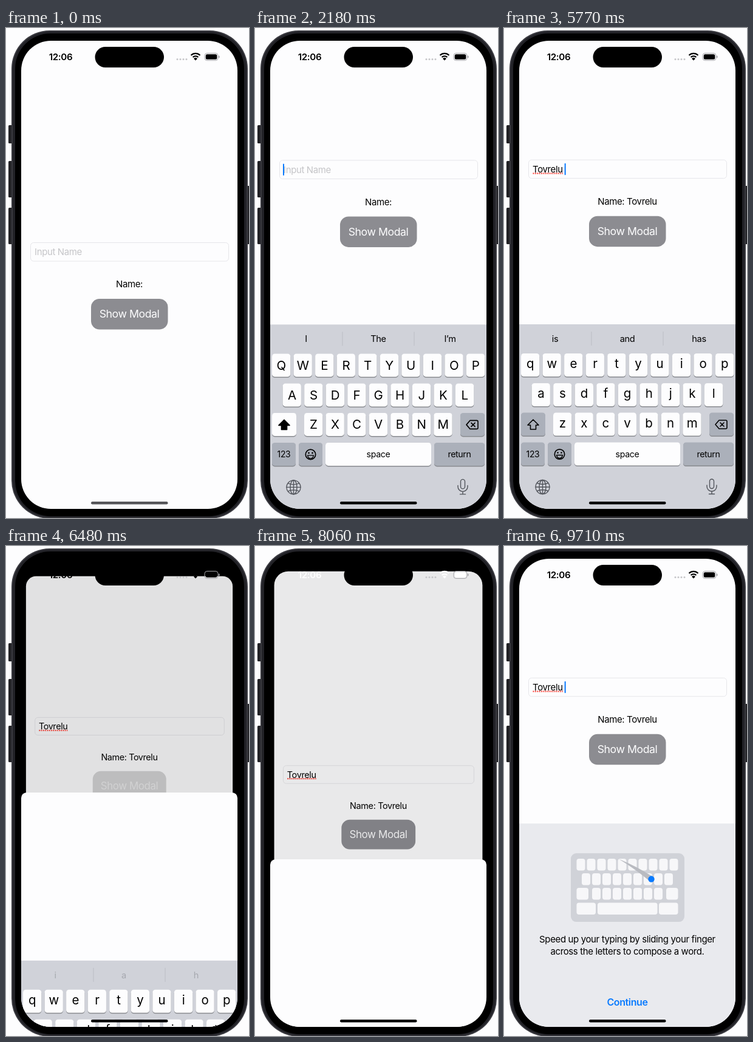
An HTML page that plays this animation: 400x807 px, repeating every 9.73 s.

```html
<!DOCTYPE html>
<html lang="en">
<head>
<meta charset="utf-8">
<title>Name form with modal sheet</title>
<style>
html, body { margin: 0; width: 100%; height: 100%; overflow: hidden; background: #fdfdfe; }
svg { display: block; width: 400px; height: 807px; }
text { font-family: Inter, "Open Sans", sans-serif; font-size: 15px; letter-spacing: -.025em; white-space: pre; }
</style>
</head>
<body>
<script>
const LOOP = 9730;
const NAME = 'Tovrelu';
const PAPER = '#fdfdfe', BOARD = '#d0d2d9', GREY_KEY = '#abb0ba', BLUE = '#087aff';
const MID = 203;

function el(tag, attrs = {}, parent) {
  const node = document.createElementNS('http://www.w3.org/2000/svg', tag);
  set(node, attrs);
  if (parent) parent.append(node);
  return node;
}
function set(node, attrs) {
  for (const key in attrs) node.setAttribute(key, attrs[key]);
}
const group = (parent) => el('g', {}, parent);
const box = (parent, x, y, width, height, rx, fill, more = {}) =>
  el('rect', { x, y, width, height, rx, fill, ...more }, parent);
const path = (parent, d, more = {}) =>
  el('path', { d, fill: 'none', stroke: '#000', 'stroke-width': 1.6, 'stroke-linecap': 'round', 'stroke-linejoin': 'round', ...more }, parent);
const disc = (parent, cx, cy, r, more = {}) => el('circle', { cx, cy, r, ...more }, parent);

// y is the middle of the capitals
function label(parent, str, x, y, size = 15, more = {}) {
  const node = el('text', { x, y: y + size * .36, 'text-anchor': 'middle', ...more }, parent);
  node.style.fontSize = size + 'px';
  node.textContent = str;
  return node;
}
function write(node, str) {
  if (node.textContent !== str) node.textContent = str;
}

const clamp = v => Math.min(1, Math.max(0, v));
const ramp = (t, from, to) => clamp((t - from) / (to - from));
// critically damped spring, progress after ms
function spring(ms) {
  const k = Math.max(0, ms) * .01825;
  return 1 - (1 + k) * Math.exp(-k);
}
const mix = (a, b, k) => `rgb(${a.map((v, i) => Math.round(v + (b[i] - v) * k))})`;

const svg = el('svg', { viewBox: '0 0 400 807' }, document.body);
const clip = el('clipPath', { id: 'screen' }, el('defs', {}, svg));
box(clip, 25, 21, 356, 771, 49, '#000');

// phone body
for (const [x, y, h] of [[4, 160, 30], [4, 219, 60], [4, 296, 60], [395, 260, 96]]) box(svg, x, y, 7, h, 1.5, '#222226');
box(svg, 9, 4, 389, 804, 63, '#3a3a40');
box(svg, 11, 6, 385, 800, 61, '#222227');
box(svg, 15, 9, 377, 795, 58, '#000');

const screen = el('g', { 'clip-path': 'url(#screen)' }, svg);
box(screen, 25, 21, 356, 771, 0, '#000');

// form
const card = group(screen);
const cardBack = box(card, 25, 21, 356, 790, 0, PAPER);
const form = group(card);
box(form, 40.5, 353.5, 326, 30.5, 5, 'none', { stroke: '#e6e6ea' });
const marked = box(form, 44, 357, 22, 22, 2, '#cfe0f7');
const input = label(form, '', 47, 369, 15, { 'text-anchor': 'start' });
const wavy = el('line', { x1: 47.5, x2: 97, y1: 375.8, y2: 375.8, stroke: '#ff3b30', 'stroke-width': 2, 'stroke-dasharray': '2 1.4' }, form);
const caret = box(form, 46, 359, 2, 19.5, 1, BLUE);
const nameLine = label(form, 'Name:', MID, 422);
const button = box(form, 140, 446, 126.5, 50.5, 14, '#8e8e93');
const buttonText = label(form, 'Show Modal', MID, 471, 17.7);
const shade = box(card, 25, 21, 356, 790, 0, '#000');

const sheet = box(screen, 25, 0, 356, 800, 9, PAPER);

// keyboard, laid out at its open position
const board = group(screen);
box(board, 25, 488, 356, 330, 0, BOARD);
const pick = box(board, 144, 493, 118.5, 35, 5, '#e6e7ec');
const dividers = [143.5, 261.5].map(x => box(board, x, 500, 1, 23, 0, '#babcc4'));
const hints = [84, 203, 321].map(x => label(board, '', x, 511.5, 14.6));

function key(x, y, w, fill = PAPER) {
  box(board, x, y + 1, w, 38.5, 4.5, '#898b90');
  return box(board, x, y, w, 38, 4.5, fill);
}
const letters = [];
[['qwertyuiop', 28, 536], ['asdfghjkl', 45.6, 585], ['zxcvbnm', 81, 633.5]].forEach(([row, x, y]) => {
  [...row].forEach((char, i) => {
    key(x + i * 35.55, y, 30.3);
    letters.push({ char, y: y + 19, node: label(board, char, x + i * 35.55 + 15.1, y + 19, 20.5) });
  });
});
const shiftKey = key(28, 633.5, 40);
const shiftIcon = path(board, 'M48 645l9 9h-4.500v7h-9v-7h-4.500z');
key(338, 633.5, 40, GREY_KEY);
path(board, 'M354 646h11q2 0 2 2v10q0 2-2 2h-11l-6-7zM356 650l6 6m0-6l-6 6');
key(28, 682.5, 39, GREY_KEY);
key(72, 682.5, 39, GREY_KEY);
key(116, 682.5, 174);
key(295, 682.5, 83, GREY_KEY);
label(board, '123', 47.5, 702, 14);
label(board, 'space', MID, 701.5, 14.2);
label(board, 'return', 336.5, 702, 14.2);
disc(board, 91.5, 702, 8.2, { fill: 'none', stroke: '#000', 'stroke-width': 1.7 });
disc(board, 88.5, 699.5, 1.3);
disc(board, 94.5, 699.5, 1.3);
path(board, 'M86.500 703.500h10q-1 5-5 5t-5-5z', { 'stroke-width': 1.3 });
const thin = { stroke: '#51545b', 'stroke-width': 1.4 };
disc(board, 63.5, 756, 11.5, { fill: 'none', ...thin });
el('ellipse', { cx: 63.5, cy: 756, rx: 5.5, ry: 11.5, fill: 'none', ...thin }, board);
path(board, 'M52 756h23M63.500 744.500v23M54.500 749.500q9 4 18 0M54.500 762.500q9-4 18 0', thin);
box(board, 338.5, 743, 7, 15.5, 3.5, 'none', thin);
path(board, 'M334 753v2a8 8 0 0 0 16 0v-2M342 763v4.500M337.500 767.500h9', thin);

// typing tip panel
const tip = group(screen);
box(tip, 25, 457, 356, 360, 0, '#e9eaee');
box(tip, 110, 506, 187, 113, 9, '#d0d2d8');
const tipKey = (x, y, w) => box(tip, x, y, w, 19.5, 4, '#f7f7f9');
for (let i = 0; i < 10; i++) tipKey(119.5 + i * 17, 515, 14);
for (let i = 0; i < 9; i++) tipKey(128 + i * 17, 539, 14);
for (let i = 0; i < 7; i++) tipKey(145 + i * 17, 563, 14);
for (const [x, y, w] of [[119.5, 563, 19.5], [267, 563, 19.5], [119.5, 587.5, 31.5], [154, 587.5, 98.5], [255, 587.5, 31.5]]) tipKey(x, y, w);
const trail = path(tip, '', { fill: '#b9bbc1', stroke: 'none' });
const dot = disc(tip, 0, 0, 5.2, { fill: BLUE });
label(tip, 'Speed up your typing by sliding your finger', MID, 648);
label(tip, 'across the letters to compose a word.', MID, 667.5);
label(tip, 'Continue', MID, 751.5, 16, { fill: BLUE, 'font-weight': 600 });

// status bar
const status = group(screen);
label(status, '12:06', 90, 48, 15.2, { 'font-weight': 600 });
for (let i = 0; i < 4; i++) disc(status, 282 + i * 5, 51.5, 1.5, { fill: '#c6c6c9' });
const wifi = [7.5, 4.4].map(r => path(status, `M${312 - r} ${52.5 - r}a${r * 1.42} ${r * 1.42} 0 0 1 ${r * 2} 0`, { 'stroke-width': 2.2, 'stroke-linecap': 'butt' }));
el('path', { d: 'M312 53.500l-3-3a4.300 4.300 0 0 1 6 0z' }, status);
box(status, 327, 41.5, 22, 12, 4, 'none', { stroke: '#a6a6aa' });
el('rect', { x: 328.7, y: 43.2, width: 18.6, height: 8.6, rx: 2.5 }, status);
box(status, 350, 45.5, 1.5, 4, 1, '#a6a6aa');
box(screen, 146.5, 31, 113.5, 34, 17, '#000');
const homeBar = box(screen, 140, 780, 126.5, 4.5, 2.2, '#000');

const TYPED = [
  { at: 0, text: '', hints: ['I', 'The', 'I’m'] },
  { at: 3300, text: NAME[0], hints: [`“${NAME[0]}”`, 'The', 'To'] },
  { at: 3950, text: NAME.slice(0, 2), hints: [`“${NAME.slice(0, 2)}”`, 'an', NAME], pick: true },
  { at: 4900, text: NAME, hints: ['is', 'and', 'has'] },
  { at: 6400, text: NAME, hints: ['i', 'a', 'h'], fading: true },
];

function drawTyping(t) {
  const step = TYPED.filter(s => s.at <= t).pop();
  const { text } = step;
  const done = text === NAME;
  const upper = text === '';
  write(input, text || 'Input Name');
  set(input, { fill: text ? '#000' : '#c5c5c8' });
  write(nameLine, text ? 'Name: ' + text : 'Name:');

  const width = text ? input.getComputedTextLength() : 0;
  set(marked, { width: width + 4, visibility: text.length === 2 ? 'visible' : 'hidden' });
  set(wavy, { x2: 47 + width, visibility: done ? 'visible' : 'hidden' });
  const focused = (t > 1700 && t < 6380) || t > 9080;
  const shown = t > 9080 ? 1 : 1 - ramp(t, 5940, 6010);
  set(caret, { x: 46 + width + (done ? 4 : 0), opacity: focused ? shown : 0 });

  hints.forEach((node, i) => {
    write(node, step.hints[i]);
    set(node, { x: (step.fading ? [81, 194, 313] : [84, 203, 321])[i], fill: step.fading ? '#a6a8af' : '#000' });
  });
  set(pick, { visibility: step.pick ? 'visible' : 'hidden' });
  dividers.forEach(node => set(node, { visibility: step.pick ? 'hidden' : 'visible' }));
  for (const { char, y, node } of letters) {
    write(node, upper ? char.toUpperCase() : char);
    set(node, { y: y + (upper ? 7.4 : 5) });
  }
  set(shiftKey, { fill: upper ? PAPER : GREY_KEY });
  set(shiftIcon, { fill: upper ? '#000' : 'none' });
}

function drawSheet(t) {
  const rise = spring(t - 6381);
  const p = rise - spring(t - 7948);
  // the card grows back slightly after the sheet starts to fall
  const scale = 1 - .0815 * (rise - spring(t - 7961));
  const rx = p > .002 ? 9 + 40 * (1 - p) ** 2 : 0;
  set(card, { transform: `translate(${MID} ${21 + 53 * p}) scale(${scale}) translate(${-MID} -21)` });
  set(cardBack, { rx });
  set(shade, { rx, opacity: .2 * p });
  set(sheet, { y: 792 - 709 * p, visibility: p > .001 ? 'visible' : 'hidden' });

  const muted = t < 7950 ? ramp(t, 6300, 6460) : 0;
  set(button, { fill: mix([140, 140, 145], [212, 212, 213], muted) });
  set(buttonText, { fill: mix([253, 253, 254], [235, 235, 236], muted) });

  const light = 255 * (ramp(t, 6480, 6700) - ramp(t, 8150, 8350));
  const ink = `rgb(${[light, light, light].map(Math.round)})`;
  set(status, { fill: ink });
  wifi.forEach(node => set(node, { stroke: ink }));
  set(homeBar, { fill: t < 1700 ? '#555558' : '#000' });
}

function drawPanels(t) {
  const lift = spring(t - 1778) - spring(t - 6414) + spring(t - 9180);
  set(form, { transform: `translate(0 ${-136.3 * lift})` });
  const open = spring(t - 1685) - spring(t - 6368);
  set(board, { transform: `translate(0 ${319 * (1 - open)})` });
  const tipOpen = spring(t - 9100);
  set(tip, { transform: `translate(0 ${350 * (1 - tipOpen)})` });

  const slide = ramp(t, 9450, 9710);
  const x = 189 + 53.5 * slide, y = 516 + 32.5 * slide;
  set(dot, { cx: x, cy: y });
  set(trail, { d: `M189 515.500Q${(189 + x) / 2 + 3} ${(515 + y) / 2 - 4} ${x + 2} ${y - 4}L${x - 2} ${y + 4}Q${(189 + x) / 2} ${(515 + y) / 2} 189 515.500z` });
}

const start = performance.now();
function tick() {
  const t = (performance.now() - start) % LOOP;
  drawTyping(t);
  drawSheet(t);
  drawPanels(t);
  requestAnimationFrame(tick);
}
tick();
</script>
</body>
</html>
```
